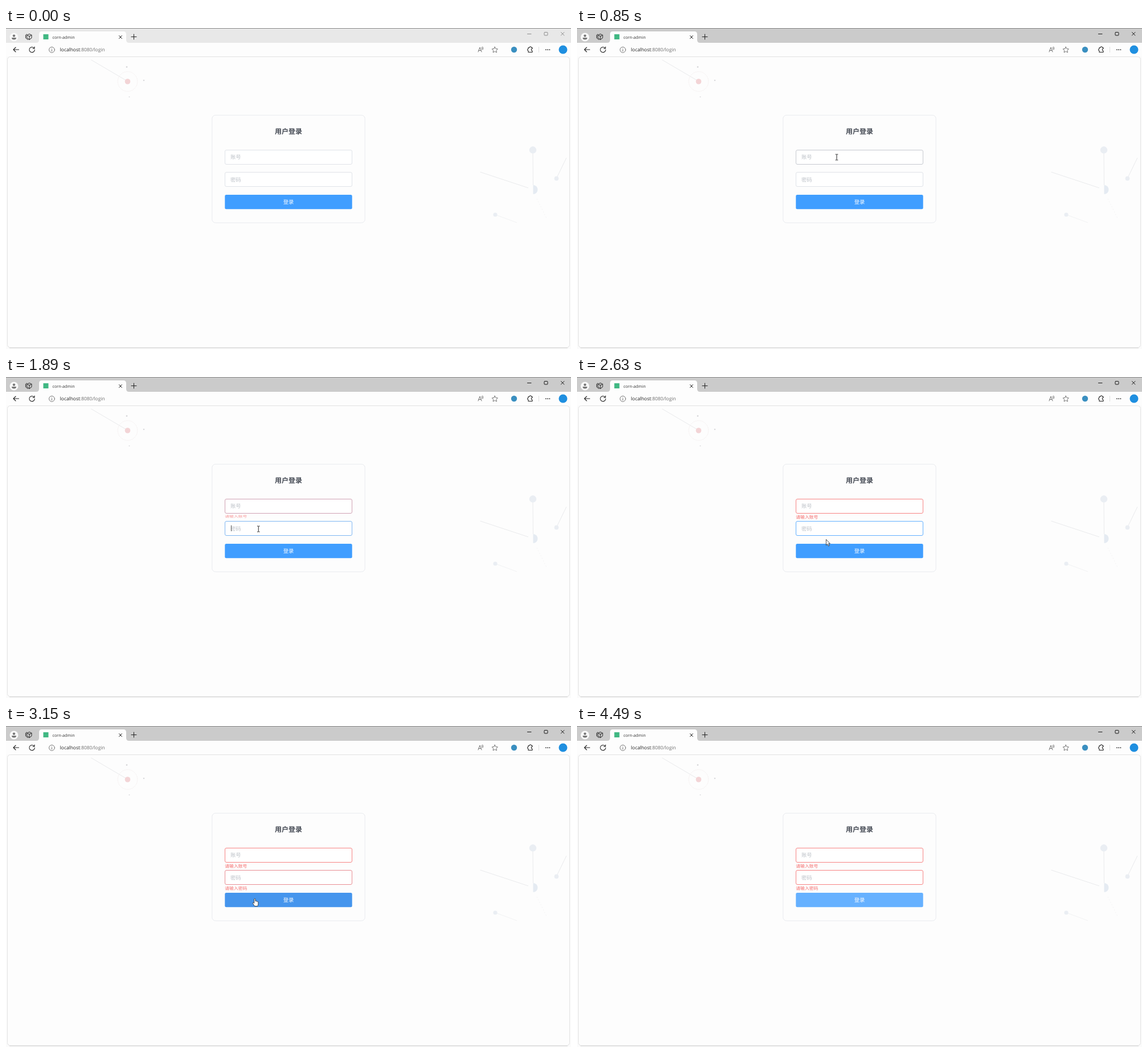
Write an HTML page that moves like this. It is 992 px wide and 564 px high and loops after 5110 ms.

```html
<!DOCTYPE html>
<html>
<head>
<meta charset="utf-8">
<title>corn-admin</title>
<style>
  html, body { margin: 0; width: 100%; height: 100%; overflow: hidden; background: #fdfdfd; }
  svg { display: block; width: 992px; height: 564px; text-rendering: geometricPrecision; }
  .ui { font-family: "Open Sans", "Noto Sans", sans-serif; }
  .cjk { font-family: "Noto Sans CJK SC", "Noto Sans CJK", sans-serif; }
  .line { fill: none; stroke: #222; stroke-linecap: round; stroke-linejoin: round; }
  .hint { font-size: 9.3px; fill: #bcc0c7; }
  .error { font-size: 7.8px; fill: #f56c6c; }
  .mid { text-anchor: middle; }
  .pointer path { fill: #fff; stroke: #222; stroke-width: .8; stroke-linejoin: round; }
  .pointer .beam { fill: none; stroke: #222; stroke-width: 1; }
</style>
</head>
<body>
<svg viewBox="0 0 992 564">
  <!-- window frame -->
  <rect width="992" height="564" fill="#fbfbfb"/>
  <rect id="bar" width="992" height="27"/>
  <path d="M0 .5H992" stroke="#8c8c8c"/>
  <path d="M53 26Q58 26 58 21V11Q58 6 63 6H206Q211 6 211 11V21Q211 26 216 26Z" fill="#fdfdfd"/>
  <rect y="26" width="992" height="24" fill="#fdfdfd"/>

  <!-- tab strip -->
  <circle cx="14" cy="16" r="7.5" fill="#f8f8f8"/>
  <circle cx="14" cy="13.6" r="2.2" fill="#777"/>
  <path d="M10 17H18Q18 20.5 14 20.5T10 17Z" fill="#777"/>
  <g class="line" stroke-width="1">
    <path d="M37 12.5L41 10.5L45 12.5V17.5L41 20.5L37 17.5ZM37 12.5L41 14.5L45 12.5M41 14.5V20.5"/>
    <path d="M36.5 11L34.5 12.5V17.5L38.5 20.5"/>
    <path d="M198.5 13.5L203.5 18.5M203.5 13.5L198.5 18.5"/>
    <path d="M220 15.5H229M224.5 11V20"/>
  </g>
  <rect x="65.5" y="11" width="9" height="9" fill="#41b883"/>
  <text class="ui" x="81.5" y="18.6" font-size="7.25" fill="#333">corn-admin</text>
  <g id="controls" class="line" stroke-width="1">
    <path d="M915.5 10.5H922"/>
    <rect x="945" y="7.5" width="6" height="5.5" rx="1"/>
    <path d="M974.5 7.5L980 13M980 7.5L974.5 13"/>
  </g>

  <!-- toolbar -->
  <g class="line" stroke-width="1.1">
    <path d="M22.5 38H13M17 34L13 38L17 42"/>
    <path d="M49.5 35.5A4.7 4.7 0 1 0 50.3 38.3M50 33V36H47"/>
    <path d="M917 34.5H919A1.7 1.7 0 0 1 922.4 34.5H924V36.5A1.7 1.7 0 0 0 924 40V42.5H917V40A1.8 1.8 0 0 1 917 36.5Z"/>
  </g>
  <g class="line" stroke-width=".9" style="stroke:#666">
    <circle cx="80.5" cy="38.3" r="4.9"/>
    <path d="M80.5 37.8V40.8M80.5 35.8V36"/>
    <path d="M829 42L832 34L835 42M830 39.5H834M835 34Q836.5 35.5 835.5 37.5M836.8 33Q838.7 35.5 837.2 38"/>
    <path id="star"/>
  </g>
  <text class="ui" x="94.7" y="41.2" font-size="8.42" fill="#707070"><tspan fill="#222">localhost</tspan>:8080/login</text>
  <circle cx="892" cy="38" r="5.2" fill="#3a8fc0"/>
  <path d="M935.5 33V43" stroke="#e0e0e0"/>
  <g fill="#222"><circle cx="948" cy="38.2" r=".9"/><circle cx="951.2" cy="38.2" r=".9"/><circle cx="954.4" cy="38.2" r=".9"/></g>
  <circle cx="978" cy="38" r="7.5" fill="#1f8fe0"/>

  <!-- page and its decoration -->
  <rect x="2.5" y="50.5" width="987" height="511" rx="5" fill="#fdfdfd" stroke="#e2e2e2"/>
  <path d="M6 562H986" stroke="#d2d2d2"/>
  <g fill="none" stroke="#e9eaec">
    <path d="M149.5 56L210 91.5"/>
    <circle cx="213.5" cy="94" r="17.3" stroke="#f5f0f0" stroke-dasharray="2 1"/>
    <path d="M925 220L925.5 276M832.5 253L917 281M968 261L984 228"/>
    <path d="M862 329L897 342" stroke="#f2f3f4"/>
    <path d="M932 300L949 334" stroke="#f4f4f5" stroke-dasharray="2 3"/>
  </g>
  <circle cx="213.5" cy="94" r="4.8" fill="#f3d4d6"/>
  <g fill="#d9d9dc"><circle cx="212" cy="68.5" r="1.4"/><circle cx="242" cy="92" r="1.3"/><circle cx="216.5" cy="121" r=".9"/></g>
  <g fill="#eaeef3">
    <circle cx="925" cy="214.3" r="6.2"/>
    <path d="M925.5 276A8 8 0 0 1 925.5 292Z" fill="#e5ebf2"/>
    <circle cx="966.5" cy="264.4" r="3.8"/>
    <circle cx="859" cy="328" r="3.6"/>
  </g>

  <!-- login card -->
  <rect x="361.8" y="153.2" width="268.4" height="189" rx="6" fill="#fdfdfd" stroke="#e9ebef"/>
  <g class="cjk">
    <text class="mid" x="496" y="185.5" font-size="12" font-weight="700" fill="#454a54">用户登录</text>
    <rect id="user" x="384.5" y="214.5" width="223" height="25" rx="2.5" fill="#fff"/>
    <rect id="pass" x="384.5" y="253.5" width="223" height="25" rx="2.5" fill="#fff"/>
    <text class="hint" x="394" y="230">账号</text>
    <text class="hint" x="394" y="269.6">密码</text>
    <text class="error" id="userError" x="384.3" y="248.9">请输入账号</text>
    <text class="error" id="passError" x="384.3" y="288.4">请输入密码</text>
    <rect id="button" x="384.3" y="293" width="223.4" height="25.3" rx="2.5"/>
    <text class="mid" x="496" y="309.1" font-size="9.3" font-weight="500" fill="#fff">登录</text>
  </g>
  <path id="caret" d="M395.5 0V10.5" stroke="#555"/>

  <g id="pointer" class="pointer">
    <path class="arrow" d="M.4 .4V10.6L2.7 8.5L4.3 12L6 11.2L4.5 7.8H7.4Z"/>
    <path class="beam" d="M-2.3 -5H-.6L0 -4.5L.6 -5H2.3M0 -4.5V4.5M-2.3 5H-.6L0 4.5L.6 5H2.3"/>
    <path class="hand" d="M-1.1 1.2Q0 -.4 1.1 1.2V5Q2.2 4.1 2.9 5.3Q4 4.6 4.6 5.9Q5.9 5.3 6 6.9V9.5Q5.9 12 4.8 13.8H-.2Q-2 11 -3.6 8.6Q-3.6 7 -2.2 7.4L-1.1 8.6Z"/>
  </g>
</svg>
<script>
const LOOP = 5110;
const $ = id => document.getElementById(id);

const TICKS = [
  0, 110, 160, 210, 250, 300, 350, 400, 440, 480, 530, 570, 620,
  670, 750, 850, 900, 950, 1010, 1060, 1120, 1180,
  1230, 1280, 1320, 1370, 1430, 1490, 1600,
  1740, 1790, 1840, 1890, 1950, 2000, 2060,
  2300, 2350, 2410, 2460, 2520, 2570, 2630, 2690, 2730, 2780,
  2870, 2930, 2990, 3060, 3150, 3200, 3330,
  3850, 3900, 3950, 4000, 4060, 4110, 4160, 4210, 4260, 4310, 4360,
  4420, 4460, 4490
];

// time, x, y, shape, easing towards the next stop
const PATH = [
  [110, 652, 517, "arrow", "out"], [620, 456, 230, "arrow"],
  [670, 456, 227, "beam"], [1180, 456, 227, "beam"],
  [1230, 451, 241, "arrow"], [1280, 446, 257, "beam"],
  [1320, 443.5, 267, "beam"], [2410, 443, 267, "beam"],
  [2570, 439, 280, "arrow"], [2630, 437, 285, "arrow"],
  [2690, 437, 293, "hand"], [2780, 436.8, 302.8, "hand"], [3840, 436.8, 302.8, "hand"],
  [3850, 438.3, 306, "hand"], [3900, 447, 312, "hand"],
  [3950, 468, 326, "arrow", "both"], [4360, 829, 546, "arrow"],
  [4420, 797, 556, "arrow"], [4460, 795, 561, "arrow"]
];
const POINTER_END = 4490;

const BASE = "#e0e3e9", HOVER = "#c6c9d0", BLUE = "#62b0ff", RED = "#f78383";
const COLORS = {
  user: [[670, BASE], [750, HOVER], [850, HOVER], [1010, BLUE], [1740, BLUE], [1790, "#adbce0"], [2000, RED]],
  pass: [[1320, BASE], [1490, HOVER], [1740, HOVER], [1950, BLUE], [2870, BLUE], [2930, "#adbce0"], [3200, RED]],
  button: [[2780, "#409eff"], [2930, "#3a8ee6"], [3060, "#3a8ee6"], [3150, "#4595ed"], [3330, "#66b1ff"]]
};
const CARETS = [[900, 1370, 221], [1790, 2300, 260.5], [2780, 2870, 260.5]];

const EASE = {
  out: p => 1 - (1 - p) ** 2,
  both: p => p * p * (3 - 2 * p),
  linear: p => p
};
const clamp = p => Math.min(1, Math.max(0, p));
const lerp = (a, b, p) => a + (b - a) * p;

function segment(keys, t) {
  const i = Math.max(0, keys.findLastIndex(k => k[0] <= t));
  const a = keys[i], b = keys[i + 1] || a;
  return [a, b, a === b ? 0 : clamp((t - a[0]) / (b[0] - a[0]))];
}

function colorAt(keys, t) {
  const [a, b, p] = segment(keys, t);
  const part = (hex, i) => parseInt(hex.slice(i, i + 2), 16);
  return `rgb(${[1, 3, 5].map(i => Math.round(lerp(part(a[1], i), part(b[1], i), p)))})`;
}

function showError(id, t, start, end, top) {
  const p = EASE.out(clamp((t - start) / (end - start)));
  $(id).setAttribute("opacity", p);
  $(id).setAttribute("transform", `translate(0 ${top}) scale(1 ${p}) translate(0 ${-top})`);
}

function drawPointer(t) {
  const on = t >= PATH[0][0] && t < POINTER_END;
  $("pointer").style.display = on ? "" : "none";
  if (!on) return;
  const [a, b, p] = segment(PATH, t);
  const e = EASE[a[4] || "linear"](p);
  $("pointer").setAttribute("transform", `translate(${lerp(a[1], b[1], e)} ${lerp(a[2], b[2], e)})`);
  for (const shape of $("pointer").children)
    shape.style.display = shape.classList.contains(a[3]) ? "" : "none";
}

function draw(t) {
  const focused = t >= 850;
  $("bar").setAttribute("fill", focused ? "#cbcbcb" : "#e8e8e8");
  $("controls").style.stroke = focused ? "#181818" : "#8d8d8d";
  for (const id of ["user", "pass"]) $(id).setAttribute("stroke", colorAt(COLORS[id], t));
  $("button").setAttribute("fill", colorAt(COLORS.button, t));
  showError("userError", t, 1740, 2060, 241);
  showError("passError", t, 2870, 3200, 280.5);
  const caret = CARETS.find(([from, to]) => t >= from && t < to);
  $("caret").style.display = caret ? "" : "none";
  if (caret) $("caret").setAttribute("transform", `translate(0 ${caret[2]})`);
  drawPointer(t);
}

const star = Array.from({ length: 10 }, (_, i) => {
  const a = i * Math.PI / 5, r = i % 2 ? 2.7 : 5.4;
  return `${858.3 + r * Math.sin(a)} ${38.6 - r * Math.cos(a)}`;
});
$("star").setAttribute("d", `M${star.join("L")}Z`);

const start = performance.now();
function frame() {
  const t = (performance.now() - start) % LOOP;
  draw(TICKS.findLast(k => k <= t));
  requestAnimationFrame(frame);
}
frame();
</script>
</body>
</html>
```
